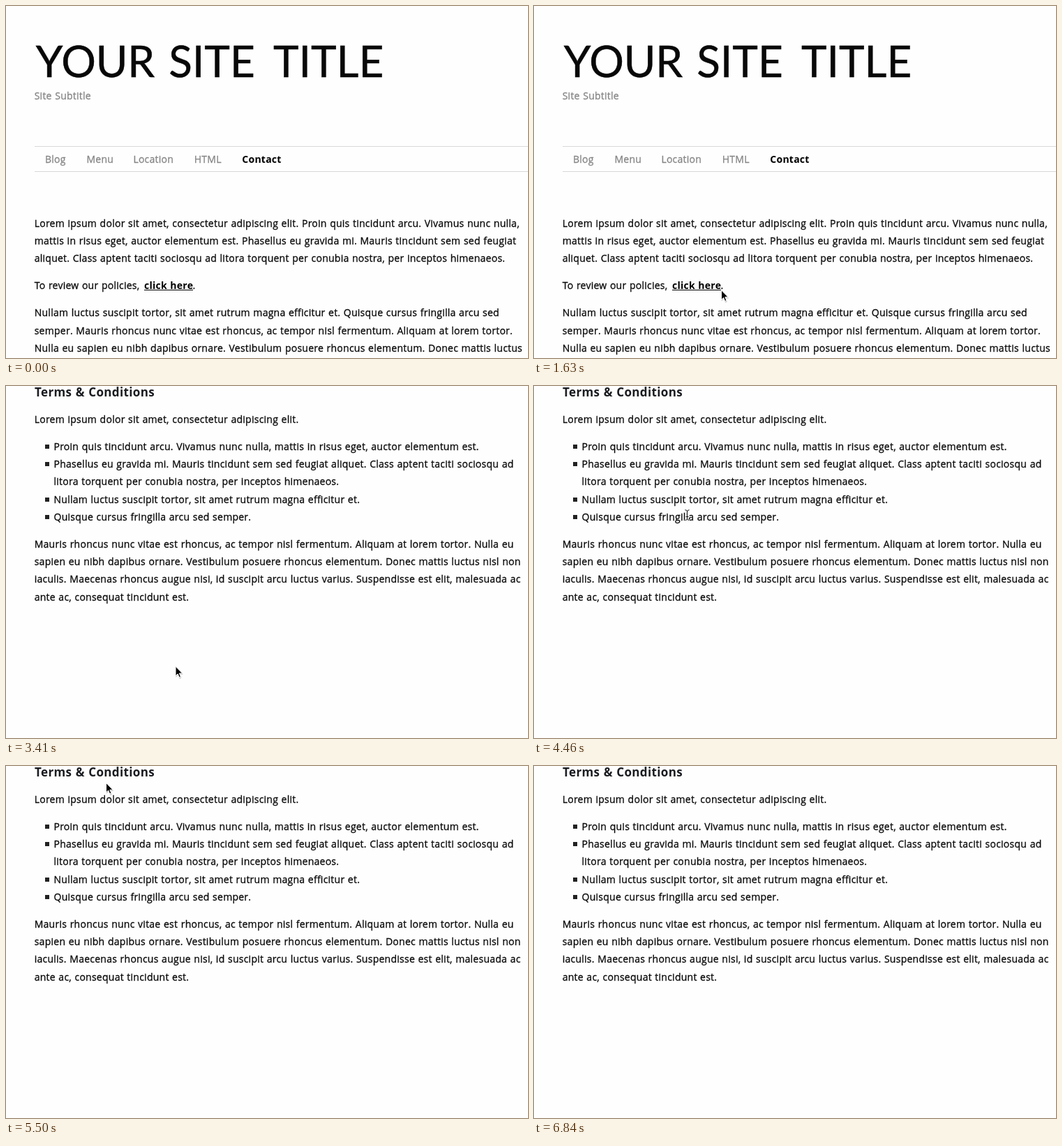
These frames come from a looping animation (748 by 505 pixels, 8 s). An HTML page:

```html
<!DOCTYPE html>
<html lang="en">
<head>
<meta charset="utf-8">
<title>Site policies</title>
<style>
html, body { margin: 0; width: 100%; height: 100%; overflow: hidden; background: #fefefe; }
svg { display: block; width: 748px; height: 505px; }
text { font: 14px "Open Sans", "Noto Sans", sans-serif; letter-spacing: .25px; word-spacing: .6px; fill: #0a0a0a; stroke: #0a0a0a; stroke-width: .3; }
.grey { fill: #858585; stroke: #858585; }
.bold { font-weight: 700; fill: #000; stroke: none; }
.title { font: 62px Lato, sans-serif; fill: #080808; stroke: #080808; stroke-width: .5; letter-spacing: 0; }
.head { font-size: 17px; font-weight: 700; letter-spacing: .36px; fill: #1a1c20; stroke: none; }
</style>
</head>
<body>
<svg viewBox="0 0 748 505">
  <defs>
    <path id="stem" d="M.8 .8Q3.5 .8 3.5 3V13.5Q3.5 15.5 .8 15.5M6.2 .8Q3.5 .8 3.5 3M3.5 13.5Q3.5 15.5 6.2 15.5M2 10.5H5"/>
  </defs>
  <rect width="748" height="505" fill="#fefefe"/>
  <g id="home">
    <path d="M41 201.5H748M41 237.5H748" stroke="#d8d8d8"/>
    <path id="underline" d="M198 407.5H268" stroke="#000"/>
  </g>
  <g id="terms"></g>
  <g id="beam" fill="none" stroke-linecap="round">
    <use href="#stem" stroke="#fff" stroke-width="2.4"/>
    <use href="#stem" stroke="#111"/>
  </g>
  <g id="arrow">
    <path d="M1 1V15.5L4.3 12.5L6.5 17.8L9.3 16.6L7.1 11.5H11.8Z" opacity=".18" transform="translate(.7 1)"/>
    <path d="M1.5 .8V14.4L4.6 11.5L6.7 16.5L8.9 15.5L6.8 10.7H11.2Z" stroke="#fff"/>
  </g>
  <g id="hand" stroke="#000" stroke-linejoin="round" stroke-linecap="round">
    <path d="M5 10.5L3.6 8.8C2.5 7.6 .5 8.4 1.3 9.9L4.8 14.8V17H12.2V15C13.7 13 14 11 14 8.3C14 6.5 11.7 6.3 11.5 7.5C11.3 5.7 9 5.7 8.8 6.9C8.5 5.4 6.6 5.4 6.5 6.5L5.8 2C5.5 .1 3.2 .3 3.5 2.2Z" fill="#fff"/>
    <path d="M6.5 6.5L6.8 9M8.8 7L9 9M11.5 7.5V9M6.7 11.5V14.5M8.7 11.5V14.5M10.7 11.5V14.5" fill="none" stroke-width=".8"/>
  </g>
</svg>
<script>
const $ = id => document.getElementById(id);
const NS = "http://www.w3.org/2000/svg";

function add(parent, tag, attrs, str = "") {
  const el = document.createElementNS(NS, tag);
  for (const k in attrs) el.setAttribute(k, attrs[k]);
  el.textContent = str;
  return parent.appendChild(el);
}
const write = (page, x, y, str, cls = "") => add($(page), "text", { x, y, class: cls }, str);

[[42.8, "YOUR"], [233.3, "SITE"], [383, "TITLE"]]
  .forEach(([x, s]) => write("home", x, 102, s, "title"));
write("home", 40.7, 134, "Site Subtitle", "grey");
[[56, "Blog"], [115.4, "Menu"], [182.4, "Location"], [269.7, "HTML"]]
  .forEach(([x, s]) => write("home", x, 225, s, "grey"));
write("home", 338.3, 225, "Contact", "bold");
[
  [317, "Lorem ipsum dolor sit amet, consectetur adipiscing elit. Proin quis tincidunt arcu. Vivamus nunc nulla,"],
  [342, "mattis in risus eget, auctor elementum est. Phasellus eu gravida mi. Mauris tincidunt sem sed feugiat"],
  [367, "aliquet. Class aptent taciti sociosqu ad litora torquent per conubia nostra, per inceptos himenaeos."],
  [406, "To review our policies,"],
  [445, "Nullam luctus suscipit tortor, sit amet rutrum magna efficitur et. Quisque cursus fringilla arcu sed"],
  [471, "semper. Mauris rhoncus nunc vitae est rhoncus, ac tempor nisl fermentum. Aliquam at lorem tortor."],
  [496, "Nulla eu sapien eu nibh dapibus ornare. Vestibulum posuere rhoncus elementum. Donec mattis luctus"]
].forEach(([y, s]) => write("home", 40.7, y, s));
write("home", 198, 406, "click here", "bold");
write("home", 267.5, 406, ".");

write("terms", 41, 15, "Terms & Conditions", "head");
[
  [53, "Lorem ipsum dolor sit amet, consectetur adipiscing elit."],
  [232, "Mauris rhoncus nunc vitae est rhoncus, ac tempor nisl fermentum. Aliquam at lorem tortor. Nulla eu"],
  [257, "sapien eu nibh dapibus ornare. Vestibulum posuere rhoncus elementum. Donec mattis luctus nisl non"],
  [282, "iaculis. Maecenas rhoncus augue nisi, id suscipit arcu luctus varius. Suspendisse est elit, malesuada ac"],
  [308, "ante ac, consequat tincidunt est."]
].forEach(([y, s]) => write("terms", 40.7, y, s));
[
  [92, "Proin quis tincidunt arcu. Vivamus nunc nulla, mattis in risus eget, auctor elementum est."],
  [117, "Phasellus eu gravida mi. Mauris tincidunt sem sed feugiat aliquet. Class aptent taciti sociosqu ad"],
  [142, "litora torquent per conubia nostra, per inceptos himenaeos."],
  [168, "Nullam luctus suscipit tortor, sit amet rutrum magna efficitur et."],
  [193, "Quisque cursus fringilla arcu sed semper."]
].forEach(([y, s]) => {
  write("terms", 68.5, y, s);
  if (y !== 142) add($("terms"), "rect", { x: 56, y: y - 8, width: 6, height: 6, fill: "#222" });
});

// Pointer steps: start time, shape, left, top
const steps = [
  [0, ""],
  [890, "beam", 513, 502], [1040, "beam", 496, 456], [1190, "beam", 464, 433],
  [1330, "arrow", 390, 425], [1480, "arrow", 330, 416], [1630, "arrow", 267, 407],
  [1770, "hand", 239, 404], [1920, "hand", 238.5, 403],
  [3410, "arrow", 241.5, 401.5], [4460, "beam", 216, 177], [4610, "beam", 192, 74],
  [4760, "arrow", 125, 34], [4910, "arrow", 86, 20], [5060, "arrow", 216, 21],
  [5200, "arrow", 158, 21], [5350, "beam", 68, 9], [5500, "arrow", 142, 23.5],
  [5650, "arrow", 78, 21], [5800, "arrow", 89, 22], [5950, "arrow", 182, 26],
  [6400, "arrow", 185, 28], [6550, "arrow", 419, 274], [6690, "arrow", 640, 477],
  [6840, ""]
];
const LOOP = 8000;
const show = (id, on) => $(id).setAttribute("display", on ? "inline" : "none");

function draw(t) {
  const [, shape, x, y] = steps.findLast(s => s[0] <= t);
  show("home", t < 3410);
  show("terms", t >= 3410);
  show("underline", t < 1770);
  for (const id of ["beam", "arrow", "hand"]) show(id, id === shape);
  if (shape) $(shape).setAttribute("transform", `translate(${x} ${y})`);
}

const start = performance.now();
function tick() {
  draw((performance.now() - start) % LOOP);
  requestAnimationFrame(tick);
}
tick();
</script>
</body>
</html>
```
